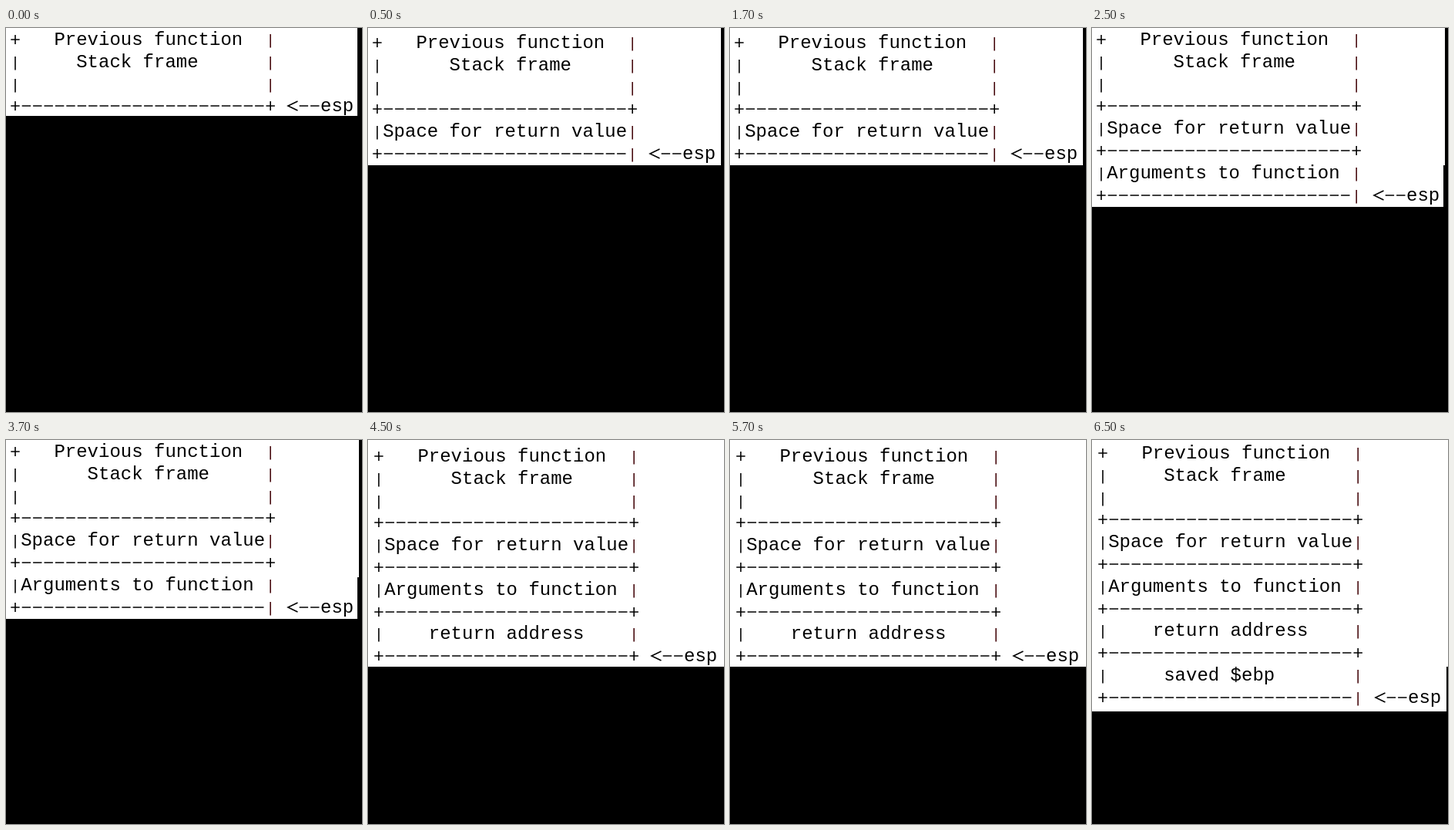
These frames come from a looping animation (462x498 px, 8 s). An HTML page:

```html
<!DOCTYPE html>
<html lang="en">
<head>
<meta charset="utf-8">
<title>Stack frame</title>
<style>
  html, body { margin: 0; width: 100%; height: 100%; overflow: hidden; background: #000; }
  svg { display: block; width: 462px; height: 498px; }
  text { font: 24px "Liberation Mono", "Courier New", monospace; fill: #000; }
  path { fill: none; stroke: #000; stroke-width: 1.6; }
  .edge { stroke: #480c10; }
</style>
</head>
<body>
<svg id="stage" viewBox="0 0 462 498"></svg>
<script>
const LOOP = 8000, COL = 14.4, ROW = 28.8, LAST = 23;

// Each step: start time, white area, offset of the text grid,
// column of the "Stack frame" label and the lower right corner.
const steps = [
  { at: 0,    w: 456, h: 114, x: 12, y: 22, label: 6, end: '+' },
  { at: 500,  w: 458, h: 178, x: 12, y: 26, label: 7, end: '|' },
  { at: 2500, w: 456, h: 232, x: 12, y: 22, label: 7, end: '|' },
  { at: 4500, w: 462, h: 294, x: 14, y: 28, label: 7, end: '+' },
  { at: 6500, w: 460, h: 352, x: 14, y: 24, label: 6, end: '|' }
];

// Cells pushed below the previous frame: column and text.
const cells = [
  [1, 'Space for return value'],
  [1, 'Arguments to function'],
  [5, 'return address'],
  [6, 'saved $ebp']
];

const stage = document.getElementById('stage');

function drawStep(step, index) {
  const x = col => step.x + col * COL;
  const y = row => Math.round(step.y + row * ROW);
  const text = (row, col, s) => `<text x="${x(col) - COL / 2}" y="${y(row)}">${s}</text>`;
  const path = (d, cls = '') => `<path class="${cls}" d="${d}"/>`;
  const dash = (row, col) => `M${x(col) - 5.7} ${y(row) - 7}h11.4`;
  const bar = (row, col) => path(`M${x(col)} ${y(row) - 14}v17.5`, col ? 'edge' : '');
  const plus = (row, col) => path(`${dash(row, col)}M${x(col)} ${y(row) - 13}v12`);
  const sides = row => bar(row, 0) + bar(row, LAST);

  function rule(row, end) {
    let d = '';
    for (let c = 1; c < LAST; c++) d += dash(row, c);
    return plus(row, 0) + path(d) + (end === '+' ? plus : bar)(row, LAST);
  }

  const bottom = 3 + 2 * index;
  let out = plus(0, 0) + text(0, 4, 'Previous function') + bar(0, LAST)
    + sides(1) + text(1, step.label, 'Stack frame') + sides(2);

  for (let i = 0; i < index; i++) {
    const row = 3 + 2 * i;
    out += rule(row, '+') + sides(row + 1) + text(row + 1, ...cells[i]);
  }
  out += rule(bottom, step.end);

  // Stack pointer arrow
  out += path(`M${x(25) + 6.5} ${y(bottom) - 13}l-12.5 6l12.5 6${dash(bottom, 26)}${dash(bottom, 27)}`);
  return out + text(bottom, 28, 'esp');
}

// White areas of earlier steps stay visible behind later ones.
const pictures = steps.map((step, i) =>
  steps.slice(0, i + 1).map(s => `<rect width="${s.w}" height="${s.h}" fill="#fff"/>`).join('')
  + drawStep(step, i));

let shown = -1;

function render(ms) {
  const t = ms % LOOP;
  const index = steps.filter(s => s.at <= t).length - 1;
  if (index !== shown) stage.innerHTML = pictures[shown = index];
}

function tick() {
  render(performance.now());
  requestAnimationFrame(tick);
}
tick();
</script>
</body>
</html>
```
